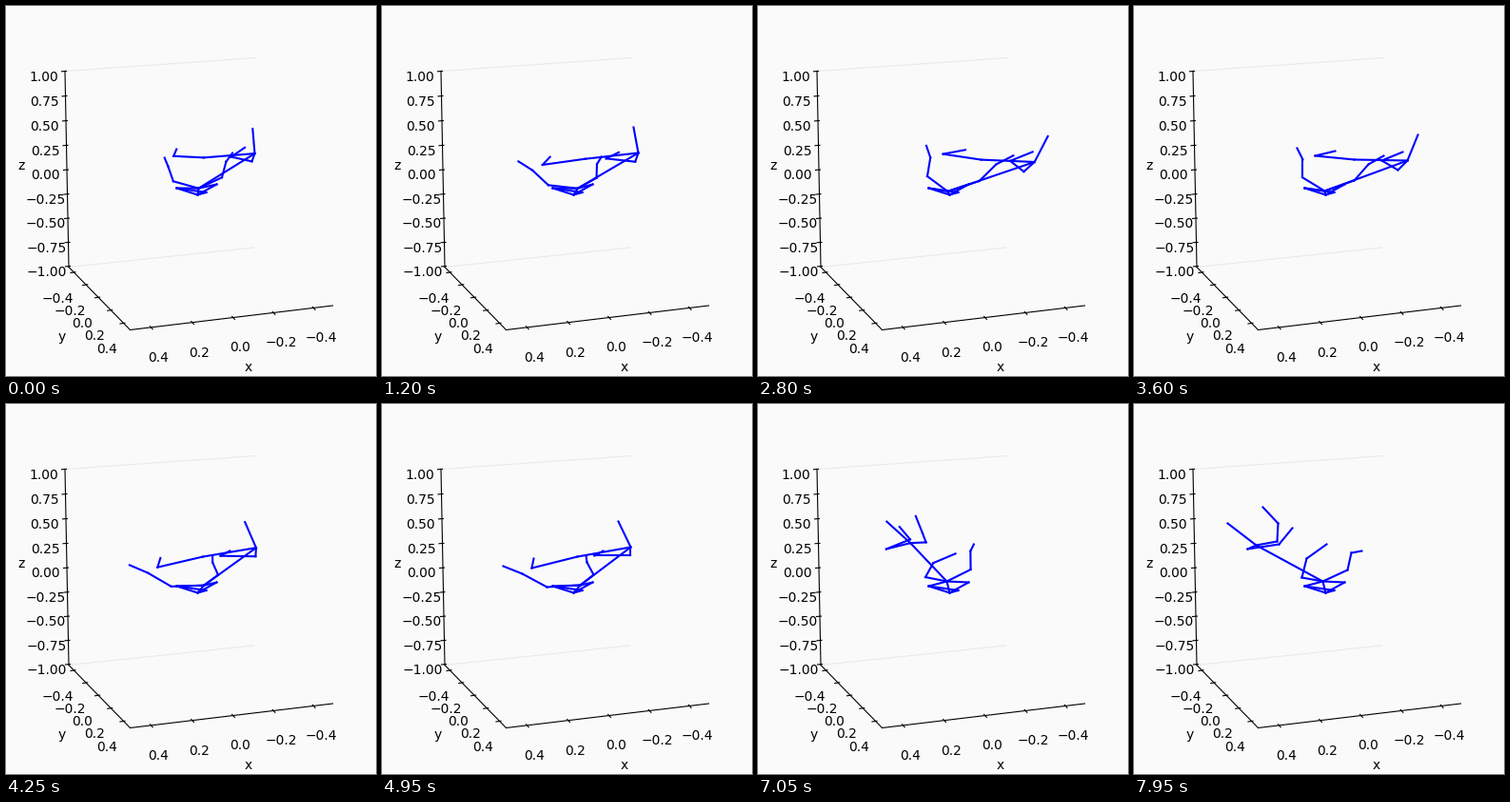
Recreate the animation shown at these times as a matplotlib script. Size 389 by 389 pixels, loop 8 s.

```python
import numpy as np
import matplotlib.pyplot as plt
from matplotlib.animation import FuncAnimation

SIZE, DPI = 389, 100
STEP, FRAMES = 50, 160
CUT = 5000  # the second movement starts here without a transition

plt.rcParams["font.family"] = "DejaVu Sans"
fig = plt.figure(figsize=(SIZE / DPI, SIZE / DPI), dpi=DPI, facecolor="#fafafa")
ax = fig.add_axes([0, 0, 1, 1])
ax.set_xlim(-0.5, SIZE - 0.5)
ax.set_ylim(SIZE - 0.5, -0.5)
ax.axis("off")


def line(p, q, color="black", width=0.8):
    return ax.plot([p[0], q[0]], [p[1], q[1]], color=color, lw=width)[0]


def label(x, y, text):
    ax.text(x, y + 5, text, fontsize=10, ha="center", va="baseline")


def number(value, digits):
    return f"{value:.{digits}f}".replace("-", "\u2212")


def draw_box():
    line((61.5, 68), (262, 54), "#e9e9e9")
    line((65.5, 274), (260, 253.5), "#e9e9e9")
    line((61.5, 68), (65.5, 274))
    line((65.5, 274), (130, 340))
    line((130, 340), (343, 314.5))
    for k in range(9):
        x, y = 61.5 + 0.5 * k, 68 + 26.2 * k - 0.07 * k * k
        line((x - 3.5, y + 0.3), (x + 1.5, y - 0.1))
        label(39.3 + 0.38 * k, y + 5.2, number(1 - 0.25 * k, 2))
    for k in range(5):
        x, y = 71 + 12.6 * k + 0.1 * k * k, 279.5 + 12.9 * k + 0.12 * k * k
        line((x - 3.5, y + 0.5), (x + 1.5, y - 0.2))
        label(x - 17, y + 26.7, number(0.2 * (k - 2), 1))
        x = 152 + 43.5 * k - 0.2 * k * k
        y = 340 - 0.1197 * (x - 130)
        line((x - 1, y - 1.1), (x + 1.7, y + 1.9))
        label(x + 7.7, y + 30.9, number(0.2 * (2 - k), 1))
    label(16, 167, "z")
    label(58.5, 347, "y")
    label(254, 379, "x")


# Each moving joint in four key poses: reach, fold, upright, back.
JOINTS = {
    "root": [(200, 194), (208, 190), (198, 186), (198, 186)],
    "knee_l": [(177, 180), (173, 192), (175, 181), (176, 182)],
    "shin_l": [(177, 161), (147, 178), (187, 172), (181, 162)],
    "foot_l": [(171, 149), (127, 170), (213, 168), (202, 147)],
    "knee_r": [(231, 183), (222, 179), (222, 173), (224, 174)],
    "shin_r": [(246, 166), (215, 166), (217, 152), (228, 156)],
    "foot_r": [(262, 157), (214, 159), (212, 139), (239, 154)],
    "neck": [(287, 162), (261, 150), (196, 143), (128, 148)],
    "head": [(298, 135), (248, 123), (177, 121), (98, 125)],
    "shoulder_l": [(231, 161), (205, 160), (152, 152), (119, 152)],
    "elbow_l": [(190, 157), (157, 172), (168, 136), (152, 147)],
    "hand_l": [(211, 152), (159, 162), (128, 127), (166, 130)],
    "shoulder_r": [(277, 172), (261, 159), (206, 146), (150, 144)],
    "elbow_r": [(260, 162), (223, 159), (197, 147), (151, 125)],
    "hand_r": [(282, 153), (232, 154), (200, 128), (135, 108)],
}
FIXED = {"base_l": (179, 191), "base_r": (221, 187),
         "base_c": (210, 195.5), "low": (201, 198)}

CHAINS = [
    "root base_l low base_r root low base_c base_l",
    "root knee_l shin_l foot_l",
    "root knee_r shin_r foot_r",
    "root neck head",
    "neck shoulder_l elbow_l hand_l",
    "neck shoulder_r elbow_r hand_r",
]
BONES = [pair for chain in CHAINS
         for pair in zip(chain.split(), chain.split()[1:])]


def curve(t, *keys):
    """Smooth Hermite curve through (time, value) keys."""
    times, values = np.array(keys, float).T
    slopes = np.gradient(values, times)
    i = int(np.clip(np.searchsorted(times, t, "right") - 1, 0, len(times) - 2))
    h = times[i + 1] - times[i]
    u = (t - times[i]) / h
    ease = u * u * (3 - 2 * u)
    return (values[i] + ease * (values[i + 1] - values[i])
            + h * u * (1 - u) * ((1 - u) * slopes[i] - u * slopes[i + 1]))


def weights(t):
    """Shares of the four key poses at time t."""
    if t < CUT:
        fold = curve(t, (0, 0.3), (600, 1.08), (1200, 0.65), (2000, 0.22),
                     (3600, 0), (4500, 1.15), (4950, 1))
        lean = 0.2 * max(0, 1 - t / 1600) ** 2
    else:
        fold = 0
        lean = curve(t, (5000, 0.03), (5400, -0.2), (5950, 0.62),
                     (6150, 1), (6900, 1.45), (7950, 2))
    back = max(0, lean - 1)
    up = lean - 2 * back
    return np.array([1 - fold - up - back, fold, up, back])


def pose(t):
    w = weights(t)
    return FIXED | {name: w @ np.array(keys) for name, keys in JOINTS.items()}


draw_box()
sticks = [line((0, 0), (0, 0), "blue", 1.5) for _ in BONES]


def update(frame):
    at = pose(frame * STEP)
    for stick, (a, b) in zip(sticks, BONES):
        stick.set_data([at[a][0], at[b][0]], [at[a][1], at[b][1]])
    return sticks


anim = FuncAnimation(fig, update, frames=FRAMES, interval=STEP,
                     repeat=True, repeat_delay=0, blit=False)
plt.show()
```
